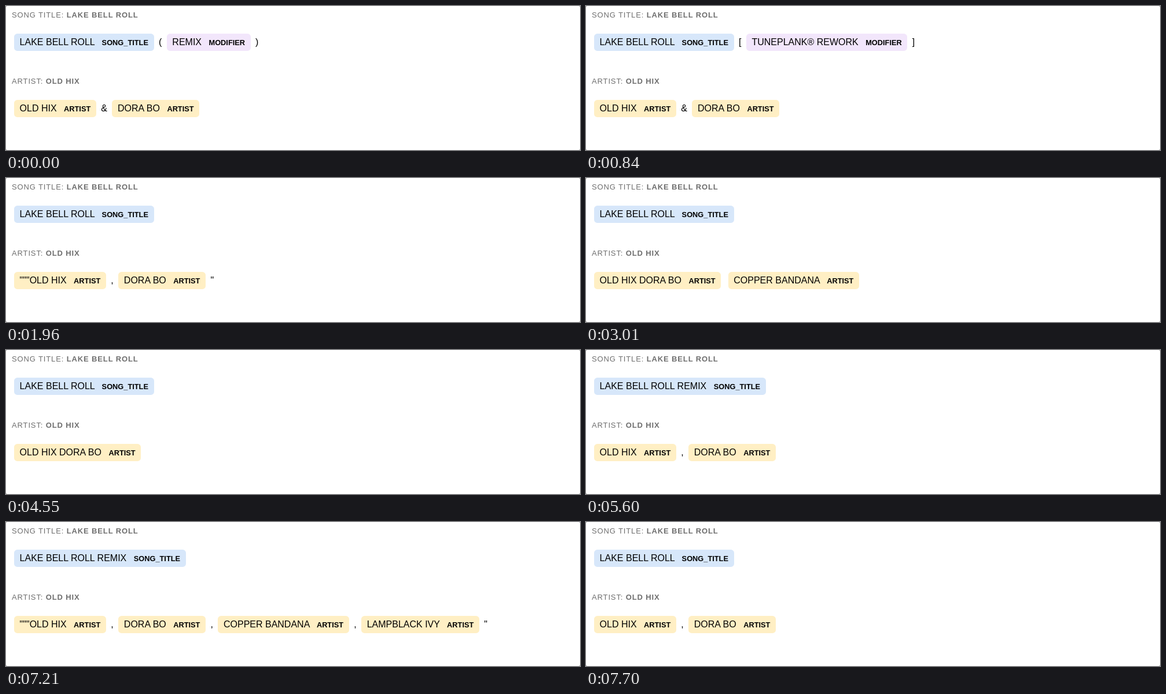
An HTML page for the animation above (8 s loop, 992 by 250 pixels).

```html
<!DOCTYPE html>
<html lang="en">
<head>
<meta charset="utf-8">
<title>Song and artist tagging</title>
<style>
  html, body { margin: 0; width: 100%; height: 100%; overflow: hidden; background: #888; }
  #stage {
    position: relative; width: 992px; height: 250px; overflow: hidden;
    background: #fff; border-radius: 2px; color: #000;
    font: 16px "Liberation Sans", Helvetica, Arial, sans-serif;
  }
  .heading {
    position: absolute; left: 10px; white-space: nowrap;
    font-size: 13px; line-height: 16px; letter-spacing: .87px; color: #6e6e6e;
  }
  .row { position: absolute; left: 10px; width: 982px; line-height: 40px; }
  .chip {
    display: inline-block; margin: 0 4px; padding: 7.2px 9.6px;
    line-height: 1; border-radius: 5.6px; white-space: nowrap;
  }
  .chip b { margin-left: 8px; font-size: 12.8px; line-height: 1; vertical-align: middle; }
  .SONG_TITLE { background: #d7e7fa; }
  .MODIFIER { background: #f2e6fb; }
  .ARTIST { background: #ffefc4; }
</style>
</head>
<body>
<div id="stage">
  <div class="heading" style="top:7.5px">SONG TITLE: <b>LAKE BELL ROLL</b></div>
  <div class="row" id="title" style="top:43.2px"></div>
  <div class="heading" style="top:122.5px">ARTIST: <b>OLD HIX</b></div>
  <div class="row" id="artist" style="top:158.2px"></div>
</div>
<script>
  const LOOP = 8000;
  const chip = (text, tag) => `<span class="chip ${tag}">${text} <b>${tag}</b></span>`;
  const song = (extra = "") => chip("LAKE BELL ROLL" + extra, "SONG_TITLE");
  const mod = text => chip(text, "MODIFIER");
  const artist = name => chip(name, "ARTIST");
  const list = (...names) => names.map(artist).join(" , ");

  const plain = song();
  const remix = `${plain} ( ${mod("REMIX")} )`;
  const remixInTitle = song(" REMIX");
  const [hix, dora, copper] = ["OLD HIX", "DORA BO", "COPPER BANDANA"];
  const duo = `${artist(hix)} &amp; ${artist(dora)}`;

  // start time, title row, artist row
  const scenes = [
    [0, remix, duo],
    [350, plain, duo],
    [420, plain, list(hix, dora, copper, "LAMPBLACK", "HOLLIS REED", "NORRI")],
    [840, `${plain} [ ${mod("TUNEPLANK® REWORK")} ]`, duo],
    [1400, remix, `${duo} , ${list("LAMPBLACK", "HOLLIS REED", "NORRI")} ${artist(copper)}`],
    [1960, plain, `${list('"""' + hix, dora)} "`],
    [2450, remixInTitle, duo],
    [3010, plain, `${artist(hix + " " + dora)} ${artist(copper)}`],
    [3500, remix, duo],
    [4060, song(` (FT. ${copper})`), duo],
    [4550, plain, artist(hix + " " + dora)],
    [5110, remix, `${duo} , ${artist(copper)}`],
    [5600, remixInTitle, list(hix, dora)],
    [6160, `${plain} ( ${mod("FT " + copper)} )`, duo],
    [6650, remix, duo],
    [7210, remixInTitle, `${list('"""' + hix, dora, copper, "LAMPBLACK IVY")} "`],
    [7700, plain, list(hix, dora)]
  ];

  const titleRow = document.getElementById("title");
  const artistRow = document.getElementById("artist");
  const start = performance.now();
  let shown;

  function draw() {
    const time = (performance.now() - start) % LOOP;
    const scene = scenes.findLast(([from]) => from <= time);
    if (scene !== shown) {
      [, titleRow.innerHTML, artistRow.innerHTML] = shown = scene;
    }
    requestAnimationFrame(draw);
  }
  draw();
</script>
</body>
</html>
```
